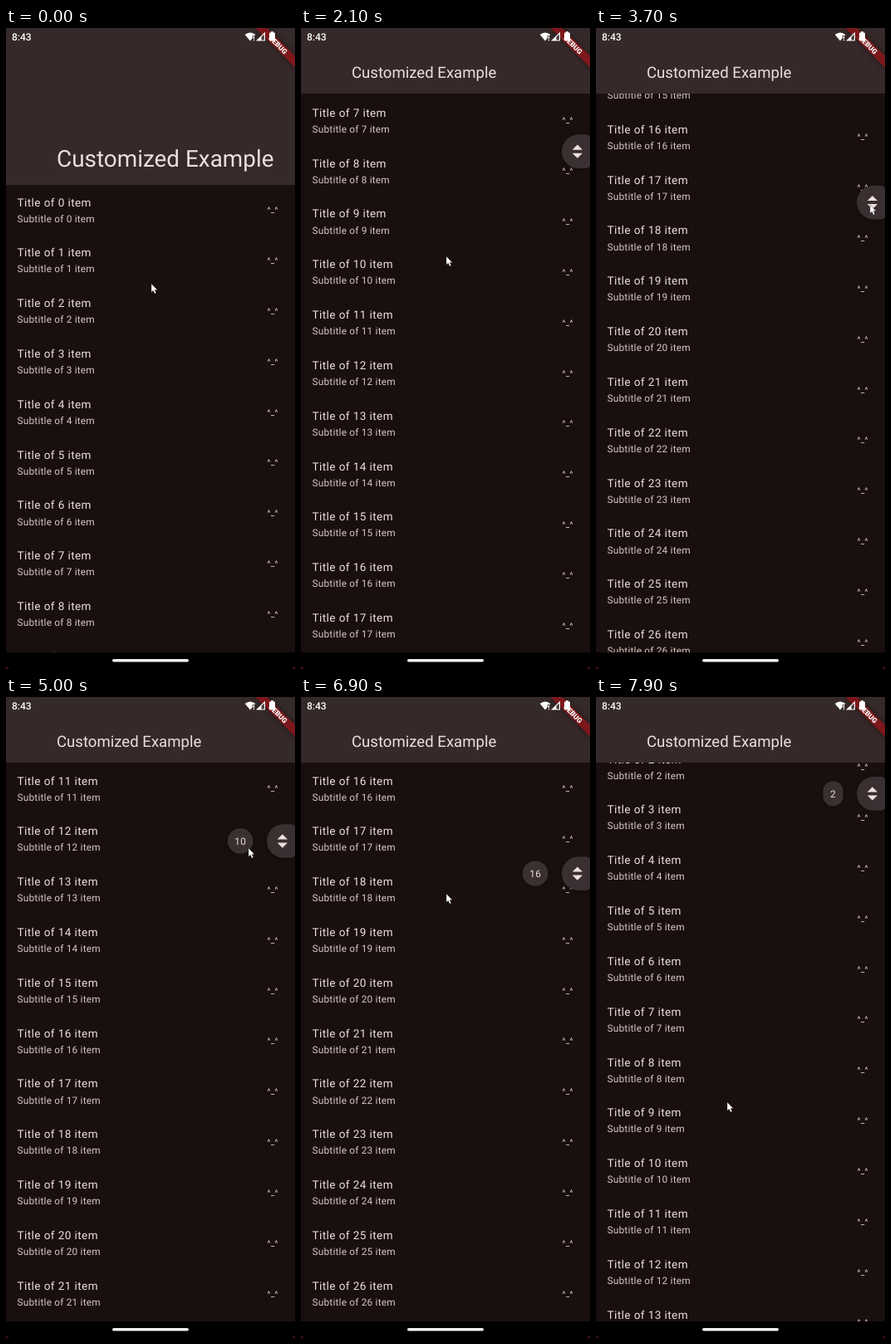
Write an HTML page with a canvas that moves like this. It is 348 by 772 pixels and loops after 8 s.

```html
<!DOCTYPE html>
<html lang="en">
<head>
<meta charset="utf-8">
<style>
  html, body { margin: 0; width: 100%; height: 100%; overflow: hidden; background: #1a0f0f; }
  canvas { display: block; width: 348px; height: 772px; }
</style>
</head>
<body>
<canvas></canvas>
<script>
const W = 348, H = 772, LOOP = 8000, STEP = 100;
const PITCH = 60.83, EXPANDED = 189, COLLAPSED = 79, NAV_TOP = 752;
const RANGE = EXPANDED - COLLAPSED, FIRST_SNAP = 109;
const THUMB_TOP = 86.5, THUMB_RATE = 0.1165, TOUCH_SLOP = 18;
const GRAB = 3700, DROP = 6600, PULL = 6900;
const INK = '#eedfde', SOFT = '#d8c6c4', RAISED = '#3b3031';

const canvas = document.querySelector('canvas');
const ctx = canvas.getContext('2d');
const ratio = window.devicePixelRatio || 1;
canvas.width = W * ratio;
canvas.height = H * ratio;
ctx.textRendering = 'geometricPrecision';

const ramp = (t, from, to) => Math.min(1, Math.max(0, (t - from) / (to - from)));

// Each move sets off from wherever the last one ended.
const cursorMoves = [
  { from: 700, to: 900, x: 184, y: 360 },
  { from: 1200, to: 1450, x: 175, y: 275 },
  { from: 2200, to: 2400, x: 196, y: 184 },
  { from: 2500, to: 3000, x: 330, y: 213 },
  { from: GRAB, to: 4300, x: 331, y: 132 },
  { from: 4500, to: 5000, x: 292, y: 182 },
  { from: 5000, to: DROP, x: 292, y: 221 },
  { from: 6700, to: PULL, x: 175, y: 237 },
  { from: PULL, to: 7150, x: 158, y: 488 },
];

function cursorAt(t) {
  let x = 175, y = 308;
  for (const move of cursorMoves) {
    const u = ramp(t, move.from, move.to);
    x += (move.x - x) * u;
    y += (move.y - y) * u;
  }
  return { x, y };
}

// The list follows the pointer past the touch slop, then glides to rest.
function flick(t, press, release, rest, glide) {
  const pulled = cursorAt(press).y - cursorAt(Math.min(Math.max(t, press), release)).y;
  const drag = Math.sign(pulled) * Math.max(0, Math.abs(pulled) - TOUCH_SLOP);
  return drag + glide * (1 - (1 - ramp(t, release, rest)) ** 2);
}

function stateAt(t) {
  const indexAt = y => ((y - THUMB_TOP) / THUMB_RATE - FIRST_SNAP) / PITCH + 0.1;
  const grip = cursorAt(Math.min(t, DROP)).y - 8.5;
  let scroll = FIRST_SNAP + PITCH * Math.round(indexAt(grip));
  if (t <= GRAB) scroll = flick(t, 1200, 1450, 2200, 475) + flick(t, 2200, 2400, 3000, 446);
  else if (t >= PULL) scroll += flick(t, PULL, 7150, LOOP, -601);
  const held = t > GRAB && t < PULL;
  const thumb = held ? grip : THUMB_TOP + THUMB_RATE * scroll;
  return { scroll, thumb, label: Math.max(0, Math.floor(indexAt(thumb))) };
}

function rect(x, y, w, h, color, radius = 0) {
  ctx.fillStyle = color;
  ctx.beginPath();
  ctx.roundRect(x, y, w, h, radius);
  ctx.fill();
}

function shape(points, color) {
  ctx.fillStyle = color;
  ctx.beginPath();
  points.forEach(([x, y]) => ctx.lineTo(x, y));
  ctx.closePath();
  ctx.fill();
}

function text(str, x, y, size, color, { weight = 400, spacing = 0, align = 'left' } = {}) {
  ctx.font = `${weight} ${size}px Roboto, sans-serif`;
  ctx.letterSpacing = spacing + 'px';
  ctx.textAlign = align;
  ctx.fillStyle = color;
  ctx.fillText(str, x, y);
}

function drawList(scroll) {
  const first = Math.max(0, Math.floor((scroll - RANGE) / PITCH) - 1);
  for (let i = first; i < first + 14; i++) {
    const y = EXPANDED + i * PITCH - scroll;
    text(`Title of ${i} item`, 13.5, y + 25.5, 13.54, INK, { spacing: 0.42 });
    text(`Subtitle of ${i} item`, 13.5, y + 44.6, 11.84, SOFT, { spacing: 0.21 });
    text('^_^', 314.5, y + 33.2, 9.3, SOFT, { weight: 500, spacing: 0.42 });
  }
}

function drawHeader(scroll) {
  const open = 1 - ramp(scroll, 0, RANGE);
  rect(0, 0, W, COLLAPSED + RANGE * open, '#362929');
  text('Customized Example', 61, 60 + 106.8 * open, 18.6 * (1 + open / 2), INK);
}

function raised(draw) {
  ctx.save();
  ctx.shadowColor = 'rgba(0,0,0,.35)';
  ctx.shadowBlur = 4 * ratio;
  ctx.shadowOffsetY = ratio;
  draw();
  ctx.restore();
}

function drawThumb(t, y) {
  const shown = ramp(t, 1300, 1600);
  ctx.save();
  ctx.globalAlpha = shown;
  ctx.translate(10 * (1 - shown), 0);
  raised(() => rect(314, y - 20.3, 35, 40.6, RAISED, [20.3, 6, 6, 20.3]));
  for (const side of [-1, 1])
    shape([[326.7, y + 2 * side], [339, y + 2 * side], [332.85, y + 8.2 * side]], INK);
  ctx.restore();
}

function drawLabel(t, y, label) {
  const width = 17.4 + 6.65 * String(label).length;
  ctx.save();
  ctx.globalAlpha = ramp(t, GRAB, GRAB + 200);
  raised(() => rect(297.5 - width, y - 15.2, width, 30.4, RAISED, width / 2));
  text(label, 297.5 - width / 2, y + 4.2, 11.84, INK, { spacing: 0.21, align: 'center' });
  ctx.restore();
}

function drawBanner() {
  ctx.save();
  ctx.translate(W, 0);
  ctx.rotate(Math.PI / 4);
  ctx.shadowColor = 'rgba(0,0,0,.5)';
  ctx.shadowBlur = 6 * ratio;
  rect(-34, 23.7, 68, 10.1, '#7c181b');
  ctx.shadowColor = 'transparent';
  text('DEBUG', 0, 31.8, 8.6, '#fff', { weight: 900, align: 'center' });
  ctx.restore();
}

function drawStatus() {
  text('8:43', 7, 14.8, 12, '#fff', { weight: 500 });
  ctx.fillStyle = '#fff';
  ctx.beginPath();
  ctx.moveTo(294, 15.5);
  ctx.lineTo(287.7, 8);
  ctx.quadraticCurveTo(294, 3, 300.3, 8);
  ctx.fill();
  rect(296.8, 9, 3.2, 6.5, '#362929');
  rect(297.7, 9.5, 1.4, 3.5, '#fff');
  rect(297.7, 13.8, 1.4, 1.4, '#fff');
  shape([[301, 15.5], [312, 4.8], [312, 15.5]], '#fff');
  shape([[307.5, 14.4], [307.5, 10.8], [310.9, 7.5], [310.9, 14.4]], '#4a3d3d');
  rect(317, 5.5, 7, 10, '#fff', 1);
  rect(319, 4.2, 3, 2, '#fff');
}

function drawNavigation() {
  rect(0, NAV_TOP, W, H - NAV_TOP, '#000');
  shape([[0, H - 4], [4, H], [0, H]], '#40101a');
  shape([[W, H - 4], [W - 4, H], [W, H]], '#40101a');
  rect(128, 760, 92, 3.6, '#f3eef0', 1.8);
}

function drawCursor({ x, y }) {
  ctx.save();
  ctx.translate(x, y);
  shape([[0, 0], [0, 10.3], [2.3, 8.2], [4, 12], [5.8, 11.2], [4.2, 7.6], [7.3, 7.4]], '#fff');
  ctx.strokeStyle = 'rgba(0,0,0,.6)';
  ctx.lineWidth = 0.5;
  ctx.stroke();
  ctx.restore();
}

function draw(t) {
  const { scroll, thumb, label } = stateAt(t);
  ctx.setTransform(ratio, 0, 0, ratio, 0, 0);
  rect(0, 0, W, H, '#1a0f0f');
  drawList(scroll);
  drawThumb(t, thumb);
  drawLabel(t, thumb, label);
  drawHeader(scroll);
  drawBanner();
  drawStatus();
  drawNavigation();
  drawCursor(cursorAt(t));
}

const start = performance.now();
function frame() {
  const t = (performance.now() - start) % LOOP;
  draw(Math.floor(t / STEP) * STEP);
  requestAnimationFrame(frame);
}
frame();
</script>
</body>
</html>
```
